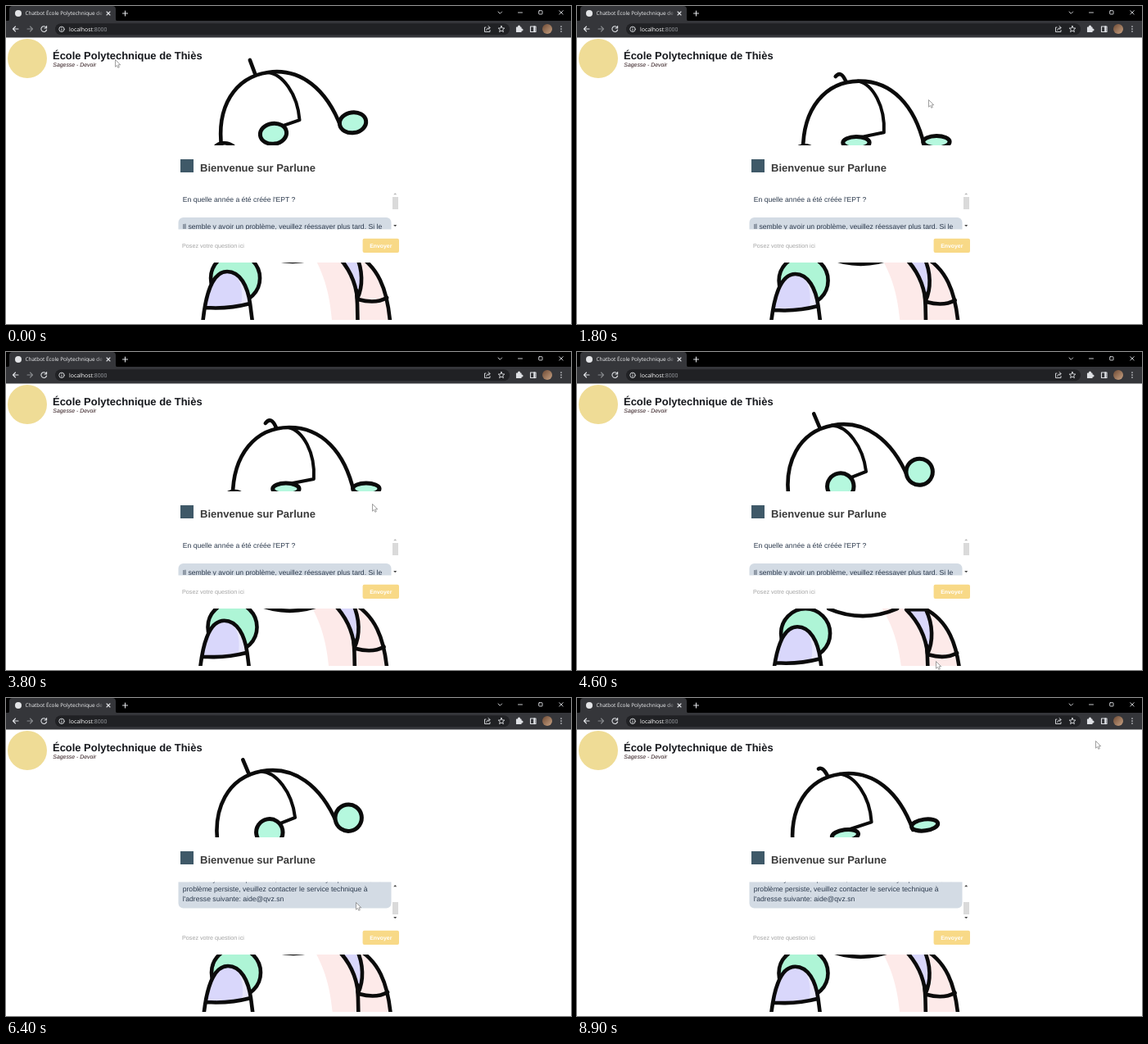
An HTML page for the animation above (9 s loop, 690 px wide and 388 px high).

```html
<!DOCTYPE html>
<html lang="fr">
<head>
<meta charset="utf-8">
<title>Chatbot</title>
<style>
  html, body { margin: 0; width: 100%; height: 100%; overflow: hidden; background: #fff; }
  svg { display: block; width: 690px; height: 388px; }
  text { font-family: "Liberation Sans", Arial, sans-serif; text-rendering: geometricPrecision; white-space: pre; }
  .ui { font-family: "Open Sans", "Noto Sans", sans-serif; }
  .msg { font-size: 8.64px; fill: #2c3a4d; }
  .ink { fill: none; stroke: #0b0b0b; stroke-width: 4.6; stroke-linecap: round; stroke-linejoin: round; }
  .eye { fill: #b5f8de; stroke-width: 5; }
  .icon { fill: none; stroke: #dfe1e5; stroke-width: 1.1; stroke-linecap: round; stroke-linejoin: round; }
</style>
</head>
<body>
<svg viewBox="0 0 690 388" width="690" height="388">
  <defs>
    <clipPath id="pageClip"><rect y="38" width="690" height="345"/></clipPath>
    <clipPath id="chatClip"><rect x="205" y="224.5" width="280" height="48"/></clipPath>
    <linearGradient id="tabFade" gradientUnits="userSpaceOnUse" x1="110" x2="120" y1="0" y2="0">
      <stop stop-color="#f1f2f4"/><stop offset="1" stop-color="#f1f2f4" stop-opacity="0"/>
    </linearGradient>
    <linearGradient id="avatar" x2="1" y2="1">
      <stop stop-color="#6d4a34"/><stop offset="1" stop-color="#c9a283"/>
    </linearGradient>
  </defs>
  <rect width="690" height="388" fill="#fff"/>

  <!-- robot -->
  <g clip-path="url(#pageClip)">
    <g id="body">
      <path d="M366 290C388 325 398 350 400 405H430C430 360 428 335 404 305V290Z" fill="#fdeae9"/>
      <path d="M425 300C455 318 471 345 471 405H430V350Z" fill="#fdeae9"/>
      <path class="ink" d="M425 304C453 318 469 345 471 405"/>
      <path class="ink" d="M404 306H428C437 325 437 345 430 360C428 340 420 322 404 306Z" style="fill:#d9d7fb"/>
      <path class="ink" d="M429 350Q431 375 430 405M431 361Q452 367 466 359"/>
      <circle class="ink" cx="281" cy="335" r="30" style="fill:#aef5d6"/>
      <path d="M245 371C246 345 255 327 271 327C287 327 296 345 299 366L304 405H240Z" fill="#fff"/>
      <path d="M245 371C246 345 255 327 271 327C287 327 296 345 299 366Q272 373 245 371Z" fill="#d9d7fb"/>
      <path d="M281 330C292 335 296 350 299 366L288 369C291 352 288 340 281 330Z" fill="#e9e8fd"/>
      <path class="ink" d="M240 405C243 352 254 327 271 327C287 327 296 345 299 366L304 405M245 371Q272 373 299 366"/>
    </g>
    <path id="chin" class="ink" d="M-42 -9Q0 9 42 -9"/>
    <g id="head">
      <circle class="ink" cx="-112" cy="20" r="17"/>
      <path class="ink" d="M-114 10C-114 -42 -86 -75 -45 -75C-5 -75 23 -45 34 4"/>
      <path class="ink" style="stroke-width:4" d="M-46 -75C-28 -71 -13 -44 -15 -12L-46 -6"/>
      <path id="antenna" class="ink"/>
      <ellipse class="ink eye" cx="-49" rx="16.2"/>
      <ellipse class="ink eye" cx="49" rx="16.2"/>
    </g>
  </g>

  <!-- chat panel -->
  <rect x="200" y="170" width="290" height="143" fill="#fff"/>
  <rect x="213" y="187" width="16" height="16" fill="#3f5968"/>
  <text x="237" y="201.5" font-size="13" font-weight="700" fill="#3a3a3a">Bienvenue sur Parlune</text>
  <g clip-path="url(#chatClip)">
    <g id="messages">
      <text class="msg" x="215.7" y="239">En quelle année a été créée l'EPT ?</text>
      <rect x="210.5" y="258" width="260" height="46.5" rx="6" fill="#d3dbe4"/>
      <text class="msg" x="215.7" y="272">Il semble y avoir un problème, veuillez réessayer plus tard. Si le</text>
      <text class="msg" x="215.7" y="284">problème persiste, veuillez contacter le service technique à</text>
      <text class="msg" x="215.7" y="296">l'adresse suivante: aide@qvz.sn</text>
    </g>
  </g>
  <path id="up" d="M473.2 230.3L475.2 228L477.2 230.3Z"/>
  <path d="M473.2 267L475.2 269.3L477.2 267Z" fill="#444"/>
  <rect id="thumb" x="472" width="7" height="15" fill="#dadada"/>
  <text x="215" y="295" font-size="7.2" fill="#a3a3a3">Posez votre question ici</text>
  <rect x="435.6" y="283.7" width="44.4" height="17.4" rx="2" fill="#f8d987"/>
  <text x="444.3" y="295" font-size="6.85" font-weight="700" fill="#fff">Envoyer</text>

  <!-- page header -->
  <circle cx="26" cy="64" r="24" fill="#efdc96"/>
  <text x="57" y="64.7" font-size="12.95" font-weight="700" fill="#15171c">École Polytechnique de Thiès</text>
  <text x="57.3" y="74.2" font-size="6.9" font-style="italic" fill="#2b1418">Sagesse - Devoir</text>

  <!-- browser window -->
  <rect width="690" height="19" fill="#000"/>
  <path d="M1 19Q4 19 4 15V4Q4 0 8 0H130Q134 0 134 4V15Q134 19 137 19Z" fill="#35363a"/>
  <rect y="18" width="690" height="20.5" fill="#35363a"/>
  <rect x="60" y="21.3" width="555" height="14" rx="7" fill="#202124"/>
  <circle cx="15" cy="9" r="4" fill="#e3e4e7"/>
  <text class="ui" x="23.5" y="11.4" font-size="6.4" fill="url(#tabFade)">Chatbot École Polytechnique de T</text>
  <text class="ui" x="77" y="30.6" font-size="6.9" fill="#fff">localhost<tspan fill="#a0a3a8">:8000</tspan></text>
  <g class="icon">
    <path d="M123 7L127 11M127 7L123 11M142.5 9H148.5M145.5 6V12"/>
    <path d="M15 28H8.5M11.5 25L8.5 28L11.5 31"/>
    <path d="M26 28H32.5M29.5 25L32.5 28L29.5 31" stroke="#85878b"/>
    <path d="M49 26A3.4 3.4 0 1 0 49.6 29M49.6 24.5V27H47"/>
    <circle cx="68" cy="28.3" r="3.2" stroke-width=".9"/><path d="M68 28V30M68 26.6V26.7" stroke-width=".9"/>
    <path d="M586 26H584.5V31.5H591V29.5M586.5 29.5Q587 26.5 591 26.5M589 24.5L591.2 26.5L589 28.5" stroke-width=".9"/>
    <path d="M605 24.3L606.1 26.9L608.8 27.1L606.7 28.9L607.4 31.6L605 30.1L602.6 31.6L603.3 28.9L601.2 27.1L603.9 26.9Z" stroke-width=".9"/>
    <path d="M623.5 26H625.5V25A1 1 0 0 1 627.5 25V26H629V28H630A1 1 0 0 1 630 30H629V31.5H623.5Z" fill="#dfe1e5"/>
    <rect x="640.5" y="25" width="6.5" height="6.5"/><path d="M645.2 25.3V31.2" stroke-width="2"/>
    <path d="M678 25V25.1M678 28V28.1M678 31V31.1" stroke-width="1.6"/>
    <path d="M601 7L603.3 9.3L605.6 7M625.5 8H630.5M675.8 5.7L680.2 10.1M680.2 5.7L675.8 10.1" stroke-width=".9"/>
    <rect x="650.7" y="5.7" width="4.3" height="4.3" rx=".6" stroke-width=".9"/>
  </g>
  <circle cx="661" cy="28" r="6" fill="url(#avatar)"/>

  <!-- pointer -->
  <g id="cursor">
    <path id="arrow" d="M.5 .5V9.2L2.5 7.4L3.8 10.3L5.3 9.6L4 6.8H6.7Z" fill="#fff" stroke="#777" stroke-width=".7"/>
    <path id="beam" d="M-2 -4.2Q0 -4.2 0 -3.2Q0 -4.2 2 -4.2M0 -3.2V3.4M-2 4.4Q0 4.4 0 3.4Q0 4.4 2 4.4" fill="none" stroke="#333"/>
  </g>
</svg>
<script>
  const LOOP = 9000, STEP = 100;
  const SWAY = 2040, BEAT = SWAY / 2;

  const $ = id => document.getElementById(id);
  const set = (el, attrs) => { for (const k in attrs) el.setAttribute(k, attrs[k]); };
  const eyes = document.querySelectorAll('.eye');

  const ramp = (t, from, to) => Math.min(1, Math.max(0, (t - from) / (to - from)));
  const ease = u => u * u * (3 - 2 * u);
  const bump = (distance, width) => (1 + Math.cos(Math.PI * Math.min(1, Math.abs(distance) / width))) / 2;

  // a bump that returns on every beat
  function pulse(t, peak, width) {
    const d = (t - peak) / BEAT;
    return bump((d - Math.round(d)) * BEAT, width);
  }

  // -1 leaning left, 1 upright on the right
  function lean(t) {
    const p = (t + SWAY - 200) % SWAY;
    return 2 * ease(ramp(p, 320, 940)) - 2 * ease(ramp(p, 1540, 1980)) - 1;
  }

  function drawRobot(t) {
    const side = lean(t);
    const dip = pulse(t, 750, 250), hop = pulse(t, 0, 200);
    const breath = pulse(t, 740, 400), sink = pulse(t, 560, 220);
    const x = 380.5 + 10.5 * side, y = 155 + (8 + 4 * side) * dip - 6 * hop;
    const curl = dip * (.75 + .25 * side);
    const open = 1 - .5 * dip - .2 * hop;
    const shift = -4.5 * breath;

    set($('head'), { transform: `translate(${x} ${y}) rotate(${5.2 * (side - 1)})` });
    set($('body'), { transform: `translate(${shift} ${9 * sink - 3 * hop})` });
    set($('chin'), { transform: `translate(${351 + shift} ${312 + 11 * sink + 3 * dip})` });
    set($('antenna'), {
      d: `M-61 -75Q${-63 - 4 * curl} ${-84 - 5 * curl} ${-65 - 9 * curl} ${-93 + 13 * curl}`
    });
    eyes.forEach(e => set(e, { ry: 18.7 * open - 2.5 }));
  }

  function drawChat(t) {
    const offset = 48 * ramp(t, 5100, 5300) - 2 * bump(t - 7400, 300);
    set($('messages'), { transform: `translate(0 ${-offset})` });
    set($('thumb'), { y: 233 + offset / 3 });
    set($('up'), { fill: offset > 0 ? '#444' : '#bbb' });
  }

  // start, end, x, y of each glide
  const glides = [
    [0, 800, 429, 114], [3100, 3700, 447, 185], [4000, 4600, 438, 377],
    [4600, 5300, 432, 273], [5900, 6400, 427, 249], [7500, 8100, 633, 52]
  ];

  function drawPointer(t) {
    let x = 133, y = 65;
    for (const [from, to, toX, toY] of glides) {
      const u = ramp(t, from, to);
      x += (toX - x) * u;
      y += (toY - y) * u;
    }
    const typing = t >= 5200 && t < 6100;
    set($('cursor'), { transform: `translate(${x} ${y})` });
    set($('beam'), { visibility: typing ? 'visible' : 'hidden' });
    set($('arrow'), { visibility: typing ? 'hidden' : 'visible' });
  }

  const start = performance.now();
  function tick() {
    const elapsed = (performance.now() - start) % LOOP;
    const t = Math.floor(elapsed / STEP) * STEP;
    drawRobot(t);
    drawChat(t);
    drawPointer(t);
    requestAnimationFrame(tick);
  }
  tick();
</script>
</body>
</html>
```
